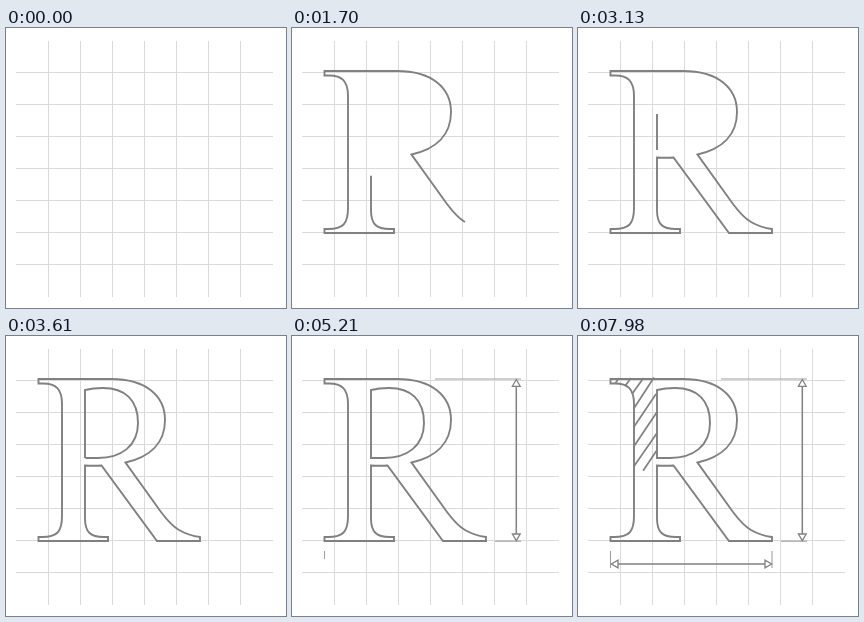
Write an HTML page that moves like this. It is 280x280 px and loops after 8000 ms.

```html
<!DOCTYPE html>
<html lang="en">
<head>
<meta charset="utf-8">
<title>Letter construction</title>
<style>
  html, body { margin: 0; width: 100%; height: 100%; overflow: hidden; background: #fff; }
  svg { display: block; width: 100%; height: 100%; }
  path { fill: none; stroke: #808080; }
  .grid { stroke: #dadada; stroke-width: 1; }
  .letter { stroke-width: 1.9; stroke-linejoin: miter; }
  .guide { stroke: #a0a0a0; stroke-width: 1.1; }
  .shaft { stroke-width: 1.5; }
  .head { stroke-width: 1.3; }
  .hatch { stroke-width: 1.7; }
</style>
</head>
<body>
<svg id="stage" viewBox="0 0 280 280"></svg>
<script>
const LOOP = 8000;
const stage = document.getElementById('stage');
const strokes = [];

function addPath(kind, d) {
  const path = document.createElementNS('http://www.w3.org/2000/svg', 'path');
  path.setAttribute('class', kind);
  path.setAttribute('d', d);
  stage.appendChild(path);
  return path;
}

// A path that draws itself from start for the given duration (ms)
function addStroke(kind, start, duration, d) {
  const path = addPath(kind, d);
  strokes.push({ path, start, duration, length: path.getTotalLength() });
}

// cubic-bezier(.25, .1, .25, 1)
function ease(x) {
  if (x <= 0) return 0;
  if (x >= 1) return 1;
  const curve = (u, a, b) => 3 * a * u * (1 - u) ** 2 + 3 * b * u * u * (1 - u) + u ** 3;
  let low = 0, high = 1;
  for (let i = 0; i < 24; i++) {
    const mid = (low + high) / 2;
    if (curve(mid, .25, .25) < x) low = mid; else high = mid;
  }
  return curve(low, .1, 1);
}

let grid = '';
for (let i = 1; i < 8; i++) {
  grid += `M${10.5 + 32 * i} 13V269M10 ${12.5 + 32 * i}H267`;
}
addPath('grid', grid);

addStroke('letter', 665, 2240,
  'M173 194C166 190 161 184 155 176L119.5 126.5C144 121 159 107 159 84' +
  'C159 60 140 43 105 43H32.5V47.5H37C50 47.5 56 53 56 68V180' +
  'C56 196 51 201 36 201H32.5V205H102V201H98C84 201 79 196 79 182V129.5' +
  'Q88 130 95.5 129.5L151 205H194V201C186 200 180 198 173 194Z');
addStroke('letter', 3045, 610,
  'M79 122V54C85 52.5 90 52 97 52C119 52 132 64 132 87C132 110 115 122 92 122Z');

// Height
addStroke('guide', 3755, 225, 'M143 43H229');
addStroke('guide', 4095, 225, 'M203 205.2H229');
addStroke('shaft', 4405, 345, 'M224.3 50V198');
addStroke('head', 4835, 60, 'M224.3 43.5L228.2 50.3H220.4Z');
addStroke('head', 4995, 60, 'M224.3 204.7L220.4 198H228.2Z');

// Width
addStroke('guide', 5180, 110, 'M32.5 215V232');
addStroke('guide', 5405, 110, 'M194 215V232');
addStroke('shaft', 5625, 345, 'M40 228H187');
addStroke('head', 6055, 60, 'M33.3 228L40 224.1V231.9Z');
addStroke('head', 6245, 60, 'M193.6 228L187 231.9V224.1Z');

// Hatching: x1, y1, x2, y2
[
  [41, 42, 37.5, 47],
  [53, 42, 47.5, 49.5],
  [65.5, 42, 54, 58],
  [76, 41.5, 55.5, 73],
  [78, 58, 55.5, 91.5],
  [79, 76, 55.5, 111],
  [79, 97, 55.5, 131],
  [79, 114, 55.5, 149]
].forEach(([x1, y1, x2, y2], i) => {
  addStroke('hatch', 6421 + 217 * i, 120, `M${x1} ${y1}L${x2} ${y2}`);
});

function render(time) {
  for (const { path, start, duration, length } of strokes) {
    const part = ease((time - start) / duration);
    path.style.visibility = part > 0 ? 'visible' : 'hidden';
    path.style.strokeDasharray = part < 1 ? `${part * length} ${length + 10}` : 'none';
  }
}

const origin = performance.now();
function tick() {
  render((performance.now() - origin) % LOOP);
  requestAnimationFrame(tick);
}
render(0);
requestAnimationFrame(tick);
</script>
</body>
</html>
```
